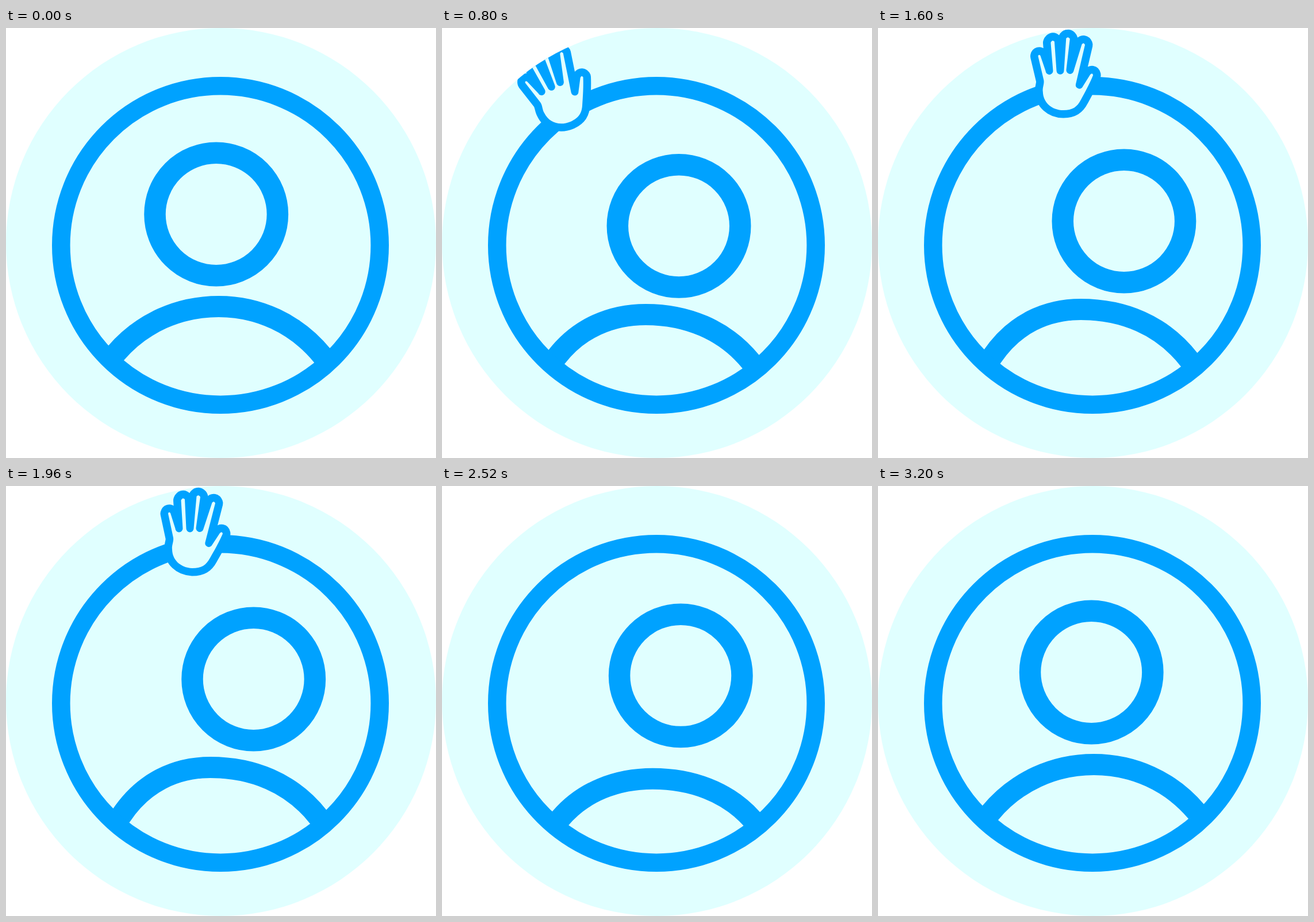
Animation of 748 by 748 pixels, one loop 4.08 s. Source, as an HTML page:

```html
<!DOCTYPE html>
<html lang="en">
<head>
<meta charset="utf-8">
<title>Waving avatar</title>
<style>
  html, body { margin: 0; width: 100%; height: 100%; overflow: hidden; background: #fff; }
  svg { display: block; width: 100vw; height: 100vh; }
  .line { fill: none; stroke: #00a2ff; }
  #hand { fill: #e0ffff; stroke: #00a2ff; stroke-width: 27; stroke-linejoin: round; paint-order: stroke; }
</style>
</head>
<body>
<svg viewBox="0 0 748 748">
  <defs>
    <clipPath id="disc"><circle cx="374" cy="374" r="374"/></clipPath>
    <clipPath id="inside"><circle cx="373" cy="378" r="277"/></clipPath>
  </defs>
  <circle cx="374" cy="374" r="374" fill="#e0ffff"/>
  <g clip-path="url(#inside)">
    <path id="body" class="line" stroke-width="37"/>
  </g>
  <circle id="head" class="line" r="106.7" stroke-width="37.5"/>
  <circle class="line" cx="373" cy="378" r="277.2" stroke-width="31.6"/>
  <g clip-path="url(#disc)">
    <path id="hand" d="M289 110C288 103 292 97 291 90L282 48Q283 44 286 47L294.5 74
      A6.5 6.5 0 0 0 307.5 74L304.5 25Q307 19 311 23L313.5 74
      A6.5 6.5 0 0 0 326.5 74L331.5 18Q335 14 338 19L330.5 73
      A6.5 6.5 0 0 0 343 76L358.5 29Q362 25 364 30L346.5 98
      A6.5 6.5 0 0 0 357.5 104L372 82Q376 78 377 83
      C371 97 362 113 355 125C348 138 340 143 324 143C303 142 289 128 289 110Z"/>
  </g>
</svg>
<script>
const LOOP = 4080, STEP = 40;
const byId = id => document.getElementById(id);
const head = byId('head'), body = byId('body'), hand = byId('hand');

const progress = (t, from, to) => Math.min(Math.max((t - from) / (to - from), 0), 1);
const ramp = (t, from, to) => {
  const u = progress(t, from, to);
  return u * u * (3 - 2 * u);
};
const pulse = (t, peak, reach) => 1 - ramp(Math.abs(t - peak), 0, reach);

// Point on the ring's inner edge, measured in degrees from straight down.
const onRing = degrees => {
  const a = degrees * Math.PI / 180;
  return [373 + 261 * Math.sin(a), 378 + 261 * Math.cos(a)];
};

// One half of the shoulder line: its end, both curve handles and an overrun under the ring.
function shoulder([x, y], [topX, topY], fullness) {
  const dx = topX - x, dy = topY - y;
  return {
    end: [x, y],
    overrun: [x - 0.25 * dx, y - 0.65 * dy],
    low: [x + 0.253 * dx, y + fullness * dy],
    high: [topX - 0.385 * dx, topY]
  };
}

function drawFigure(t, drift) {
  const lean = ramp(t, 480, 940) - ramp(t, 2280, 3000);
  const hop = pulse(t, 520, 280);
  const dip = pulse(t, 800, 240);
  const sag = pulse(t, 2520, 280);

  head.setAttribute('cx', 365.7 + 59.5 * lean + drift);
  head.setAttribute('cy', 324 + 12 * lean - 15 * hop + 11 * dip - 3 * sag);

  const tilt = 20 * lean - 6 * sag;
  const sink = 5 * lean - 8 * hop + 10 * dip + 21 * sag;
  const top = [370 - tilt + drift, 484.5 + sink];
  const fullness = 0.65 + 0.05 * lean;
  const left = shoulder(onRing(-44.1 + 0.11 * sink + 0.05 * tilt + 0.2 * drift), top, fullness);
  const right = shoulder(onRing(42.7 - 0.13 * sink - 0.12 * tilt + 0.2 * drift), top, fullness);
  body.setAttribute('d', `M${left.overrun}L${left.end}C${left.low} ${left.high} ${top}`
    + `C${right.high} ${right.low} ${right.end}L${right.overrun}`);
}

function drawHand(t, drift) {
  const away = (1 - progress(t, 600, 1050)) ** 2;
  const exit = ramp(t, 2320, 2480);
  const settle = drift - 5.5;
  const wave = 5 * Math.sin(progress(t, 1240, 2320) * 6 * Math.PI);
  const x = settle - 390 * away - 20 * exit;
  const y = 240 * away ** 2 - 190 * exit;
  const angle = 0.45 * settle - 76 * away - 10 * exit + wave;
  hand.setAttribute('transform', `translate(${x} ${y}) rotate(${angle} 330 85)`);
  hand.setAttribute('visibility', t > 600 && t < 2480 ? 'visible' : 'hidden');
}

function draw(now) {
  const t = Math.floor((now % LOOP) / STEP) * STEP;
  const drift = 5.5 * ramp(t, 1240, 1960);
  drawFigure(t, drift);
  drawHand(t, drift);
}

const start = performance.now();
function tick() {
  draw(performance.now() - start);
  requestAnimationFrame(tick);
}
tick();
</script>
</body>
</html>
```
